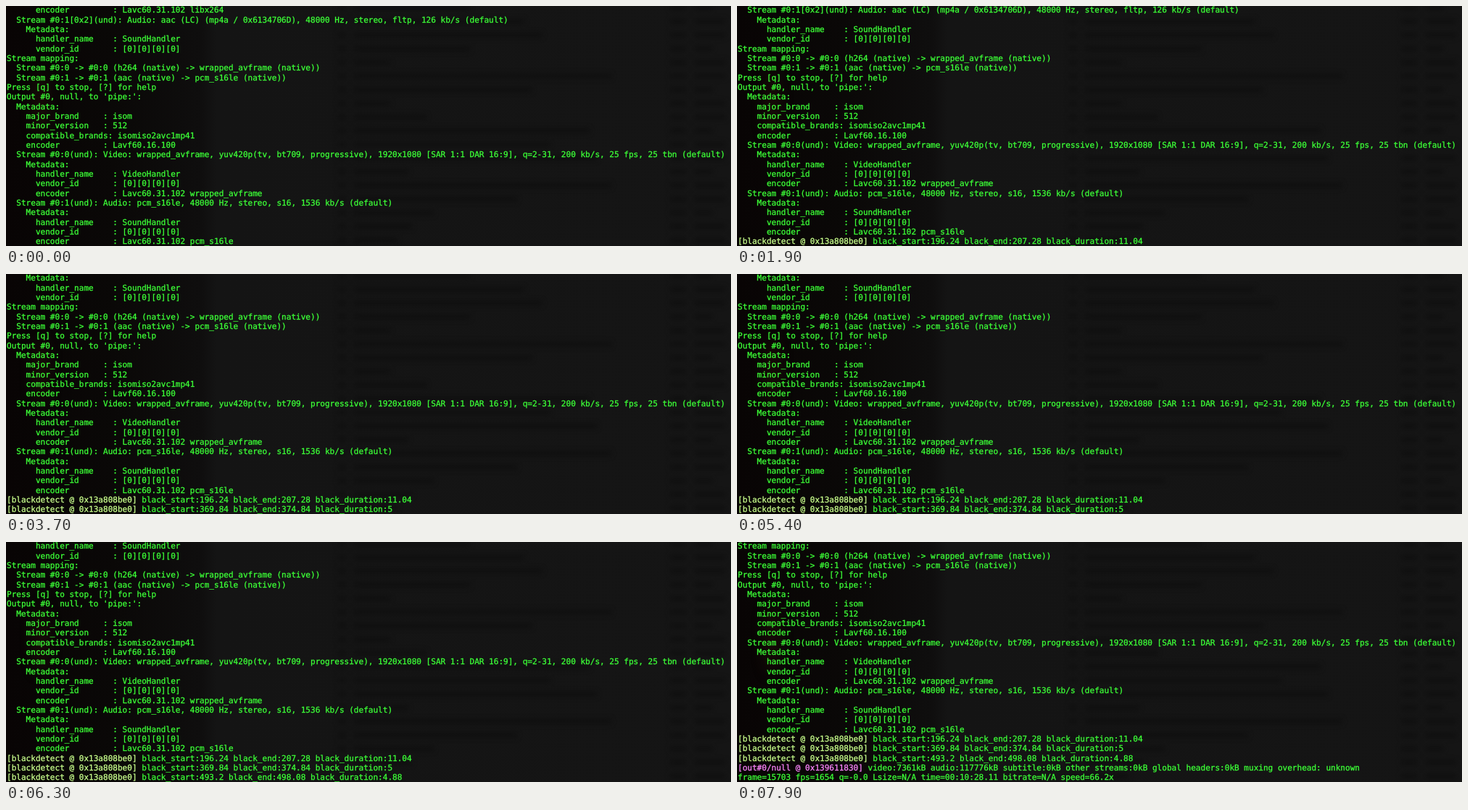
An HTML page for the animation above (8000 ms loop, 1000x332 px).

```html
<!DOCTYPE html>
<html lang="en">
<head>
<meta charset="utf-8">
<title>Terminal output</title>
<style>
  html, body { margin: 0; width: 100%; height: 100%; overflow: hidden; background: #141414; }
  svg { display: block; width: 100%; height: 100%; }
  text {
    font: 11.06px "DejaVu Sans Mono", monospace;
    white-space: pre;
    text-rendering: geometricPrecision;
    color: #3cff37;
    fill: currentColor;
    stroke: currentColor;
    stroke-width: .3px;
  }
  tspan { fill: currentColor; stroke: currentColor; }
  .filter { color: #c8ff8c; }
  .muxer { color: #fa84fa; }
</style>
</head>
<body>
<svg viewBox="0 0 1000 332" preserveAspectRatio="none" color-interpolation-filters="sRGB">
  <defs>
    <filter id="soft" x="-20%" y="-20%" width="140%" height="140%"><feGaussianBlur stdDeviation="3"/></filter>
    <filter id="softer" x="-100%" y="-100%" width="300%" height="300%"><feGaussianBlur stdDeviation="9"/></filter>
    <linearGradient id="base">
      <stop offset="0" stop-color="#080404"/>
      <stop offset=".15" stop-color="#0a0807"/>
      <stop offset=".27" stop-color="#0f0e0e"/>
      <stop offset=".29" stop-color="#141414"/>
      <stop offset="1" stop-color="#151515"/>
    </linearGradient>
  </defs>
  <rect width="1000" height="332" fill="url(#base)"/>
  <ellipse cx="48" cy="135" rx="10" ry="45" fill="#1a0b08" filter="url(#softer)"/>
  <g id="backdrop" fill="#101010" filter="url(#soft)"></g>
  <g id="screen"></g>
</svg>
<script>
const LOOP = 8000, ROWS = 25, LINE_HEIGHT = 40 / 3, FIRST_BASELINE = 9.4, LEFT = 1;

const metadata = (handler, encoder) => `    Metadata:
      handler_name    : ${handler}
      vendor_id       : [0][0][0][0]
      encoder         : Lavc60.31.102 ${encoder}`;

const log = `      encoder         : Lavc60.31.102 libx264
  Stream #0:1[0x2](und): Audio: aac (LC) (mp4a / 0x6134706D), 48000 Hz, stereo, fltp, 126 kb/s (default)
    Metadata:
      handler_name    : SoundHandler
      vendor_id       : [0][0][0][0]
Stream mapping:
  Stream #0:0 -> #0:0 (h264 (native) -> wrapped_avframe (native))
  Stream #0:1 -> #0:1 (aac (native) -> pcm_s16le (native))
Press [q] to stop, [?] for help
Output #0, null, to 'pipe:':
  Metadata:
    major_brand     : isom
    minor_version   : 512
    compatible_brands: isomiso2avc1mp41
    encoder         : Lavf60.16.100
  Stream #0:0(und): Video: wrapped_avframe, yuv420p(tv, bt709, progressive), 1920x1080 [SAR 1:1 DAR 16:9], q=2-31, 200 kb/s, 25 fps, 25 tbn (default)
${metadata("VideoHandler", "wrapped_avframe")}
  Stream #0:1(und): Audio: pcm_s16le, 48000 Hz, stereo, s16, 1536 kb/s (default)
${metadata("SoundHandler", "pcm_s16le")}
[blackdetect @ 0x13a808be0] black_start:196.24 black_end:207.28 black_duration:11.04
[blackdetect @ 0x13a808be0] black_start:369.84 black_end:374.84 black_duration:5
[blackdetect @ 0x13a808be0] black_start:493.2 black_end:498.08 black_duration:4.88
[out#0/null @ 0x139611830] video:7361kB audio:117776kB subtitle:0kB other streams:0kB global headers:0kB muxing overhead: unknown
frame=15703 fps=1654 q=-0.0 Lsize=N/A time=00:10:28.11 bitrate=N/A speed=66.2x`.split("\n");

// Each entry is the moment one more line is printed.
const printTimes = [1200, 3700, 5600, 7500, 7500];

function add(parent, tag, attributes, content = "") {
  const node = document.createElementNS("http://www.w3.org/2000/svg", tag);
  for (const name in attributes) node.setAttribute(name, attributes[name]);
  node.textContent = content;
  parent.append(node);
  return node;
}

// Blurred file list showing through the translucent window.
const backdrop = document.getElementById("backdrop");
const rowWidths = [160, 235, 260, 160, 50, 355, 245, 50, 100, 325, 270, 335, 75, 355, 225, 110, 80, 60];
rowWidths.forEach((width, i) => {
  const y = i * 18.9 - 1;
  const bar = (x, w) => add(backdrop, "rect", { x, y, width: w, height: 7 });
  bar(458, 11);
  bar(480, width);
  bar(916, 22);
  bar(950, i % 3 ? 42 : 24);
});

const screen = document.getElementById("screen");
const rows = Array.from({ length: ROWS }, (_, i) =>
  add(screen, "text", { x: LEFT, y: FIRST_BASELINE + i * LINE_HEIGHT }));

function showFrom(start) {
  rows.forEach((row, i) => {
    const line = log[start + i];
    const [prefix] = line.match(/^\[[^\]]*\]/) || [""];
    row.textContent = "";
    if (prefix) add(row, "tspan", { class: prefix.startsWith("[out") ? "muxer" : "filter" }, prefix);
    row.append(line.slice(prefix.length));
  });
}

let shown = -1;
function draw() {
  const time = performance.now() % LOOP;
  const scrolled = printTimes.filter(t => t <= time).length;
  if (scrolled !== shown) showFrom(shown = scrolled);
  requestAnimationFrame(draw);
}
draw();
</script>
</body>
</html>
```
